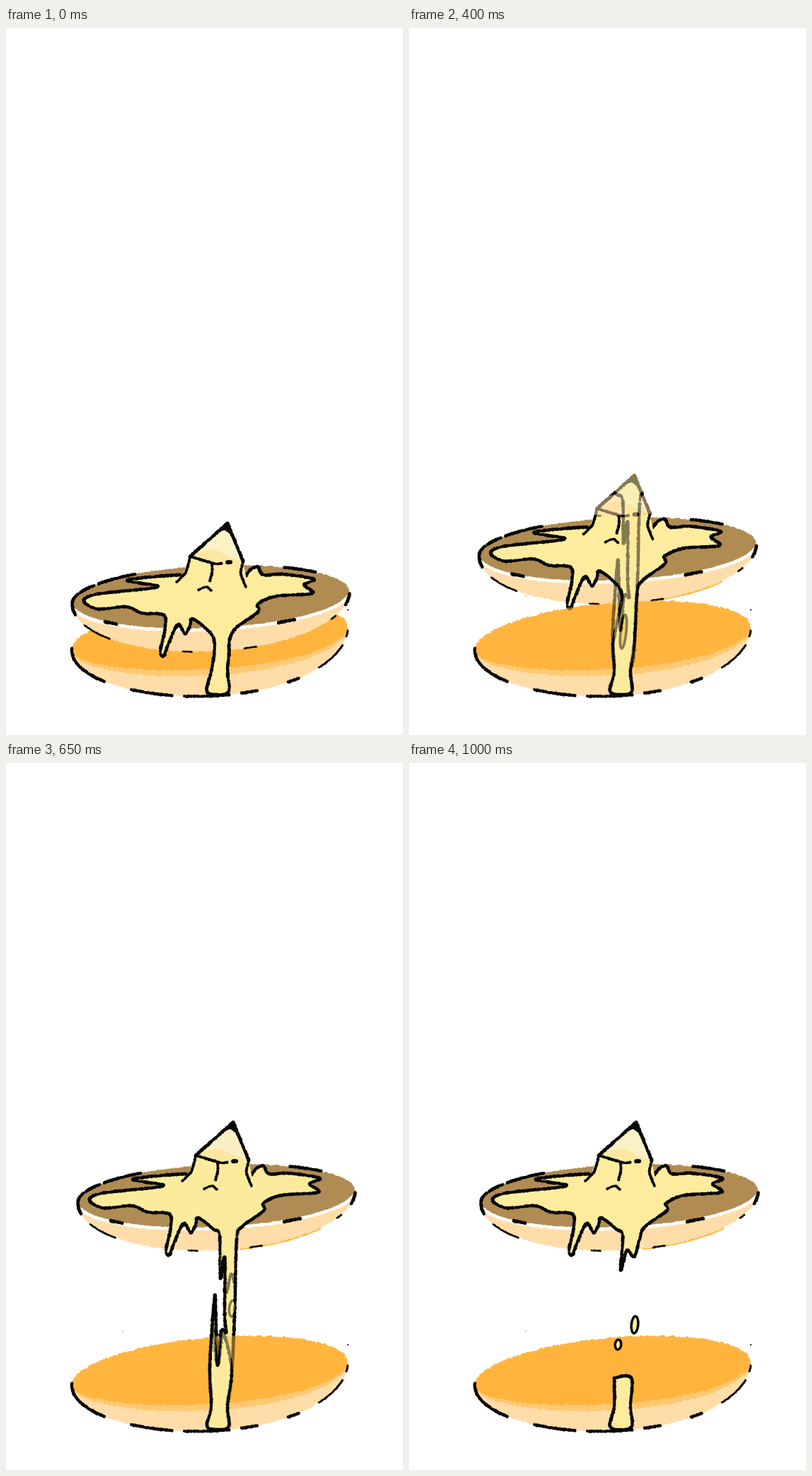
Recreate the animation shown at these times as an HTML page with a canvas. Size 561 by 998 pixels, loop 1.15 s.

```html
<!DOCTYPE html>
<html lang="en">
<head>
<meta charset="utf-8">
<title>Pancakes</title>
<style>
  html, body { margin: 0; width: 100%; height: 100%; overflow: hidden; background: #fff; }
  canvas { display: block; width: 561px; height: 998px; }
</style>
</head>
<body>
<canvas id="stage" width="561" height="998"></canvas>
<script>
const W = 561, H = 998, LOOP = 1150, STEP = 250, HOLD = 150;
const INK = '#080705', BROWN = '#b08c53', RIM = '#ffdda9', ORANGE = '#ffb53d',
      AMBER = '#ffc974', SYRUP = '#fdec9d', CREAM = '#fce7a2', PALE = '#faf2c6';

let ctx;

// Repeatable noise in -1..1
const noise = n => {
  const s = Math.sin(n * 127.1 + 11.7) * 43758.5453;
  return (s - Math.floor(s)) * 2 - 1;
};

const pairs = list => list.flatMap((v, i) => i % 2 ? [] : [[v, list[i + 1]]]);

// Catmull-Rom samples, about two pixels apart, through flat x,y key points
function curve(...list) {
  const p = pairs(list), out = [];
  for (let i = 0; i < p.length - 1; i++) {
    const a = p[Math.max(i - 1, 0)], b = p[i], c = p[i + 1], d = p[Math.min(i + 2, p.length - 1)];
    const n = Math.ceil(Math.hypot(c[0] - b[0], c[1] - b[1]) / 2);
    for (let k = 0; k < n; k++) {
      const t = k / n;
      out.push([0, 1].map(j => b[j] + 0.5 * t * (c[j] - a[j] +
        t * (2 * a[j] - 5 * b[j] + 4 * c[j] - d[j] +
        t * (3 * (b[j] - c[j]) + d[j] - a[j])))));
    }
  }
  return [...out, p[p.length - 1]];
}

// Tilted oval between two angles in degrees; the lower half has its own height
function oval(disc, from = 0, to = 360, low = disc.low) {
  const out = [];
  for (let deg = from; deg <= to; deg += 0.6) {
    const a = deg * Math.PI / 180, c = Math.cos(a), s = Math.sin(a);
    const ry = s < 0 ? disc.high : low * (1 + disc.lean * c);
    out.push([disc.x + disc.rx * c, disc.y + ry * s + disc.tilt * disc.rx * c]);
  }
  return out;
}

function fill(points, color, rough = 0.3) {
  ctx.beginPath();
  points.forEach(([x, y], i) =>
    ctx.lineTo(x + noise(i) * rough, y + noise(i + 500) * rough));
  ctx.fillStyle = color;
  ctx.fill();
}

// Crayon line: overlapping dots of uneven size
function ink(points, width = 4.7, color = INK) {
  ctx.fillStyle = color;
  ctx.beginPath();
  points.forEach(([x, y], i) => {
    const r = width / 2 * (1 + noise(i) * 0.16);
    ctx.moveTo(x + r, y);
    ctx.arc(x + noise(i + 90) * 0.3, y + noise(i + 180) * 0.3, r, 0, 7);
  });
  ctx.fill();
}

function drop(x, y, rx, ry, color = SYRUP) {
  ctx.beginPath();
  ctx.ellipse(x, y, rx, ry, 0.1, 0, 7);
  ctx.fillStyle = color;
  ctx.fill();
  ctx.strokeStyle = INK;
  ctx.lineWidth = 3.5;
  ctx.stroke();
}

const LOWER = { x: 288, y: 862, rx: 195, high: 51, low: 81, tilt: -0.082, lean: 0.1 };
const UPPER = { x: 297.5, y: 612, rx: 196, high: 45, low: 76, tilt: -0.043, lean: 0 };

const dashes = (disc, width, ...ends) =>
  pairs(ends).forEach(([a, b]) => ink(oval(disc, a, b), width));

function lowerPancake() {
  fill(oval(LOWER), RIM, 1);
  fill(oval(LOWER, 0, 360, 52), AMBER, 1.5);
  fill(oval(LOWER, 0, 360, 43), ORANGE, 1.5);
  dashes(LOWER, 4.4, 140, 183, 106, 125, 82, 101, 70, 77, 50, 56);
  dashes(LOWER, 3, 16, 38, 3, 8);
  ink([[483, 821]], 2);
  ink([[165, 802]], 2, ORANGE);
}

function upperPancake() {
  ink(oval(UPPER, 42, 80), 4, ORANGE);
  fill(oval(UPPER), RIM, 1);
  fill(oval(UPPER, 0, 360, 43), BROWN, 1);
  ctx.globalCompositeOperation = 'destination-out';
  ink(oval(UPPER, 9, 168, 45), 4.4);
  ctx.globalCompositeOperation = 'source-over';
  dashes(UPPER, 4.4, 168, 197, 200, 213, 216, 237, 302, 319, 2, 14);
  dashes(UPPER, 2.8, 137, 156, 71, 76, 98, 102, 26, 30);
  ink(oval(UPPER, 133, 140, 43));
  ink(oval(UPPER, 53, 61, 45));
}

function cone() {
  const tip = [321, 507], left = [268, 554], right = [343, 561], mid = [308, 564];
  fill([tip, left, [255, 586], [280, 604], [335, 604], [348, 586], right], SYRUP);
  fill([tip, left, mid, right], PALE);
  fill([left, [288, 545], [306, 545], [320, 553], right, mid], CREAM);
  fill([tip, [307, 520], [317, 517], [328, 525]], INK);
  ink(curve(...left, ...tip));
  ink(curve(...tip, ...right));
  ink(curve(...left, 285, 559, 303, 564, 312, 564), 4);
  ink(curve(321, 562, 325, 562), 5.6);
  ink(curve(...left, 262, 576, 249, 590), 4);
  ink(curve(...right, 340, 578, 347, 597), 4);
  ink(curve(299, 565, 299, 578, 296, 588), 4);
  ink(curve(280, 601, 291, 597, 298, 602), 3.6);
}

// Key points of the spill on either side of the strand
const LEFT = [
  254,580, 223,582, 179,588, 222,597, 138,607, 118,617, 138,628, 178,625, 200,634, 231,637,
  232,660, 226,688, 231,694, 238,676, 251,650, 261,663, 268,652, 272,642, 293,658];
const RIGHT = [
  333,655, 364,632, 364,621, 390,610, 441,606, 429,594, 443,586, 400,579, 372,580, 364,569,
  354,572, 347,581];
const FOOT = [290,908, 284,936, 300,941, 315,936, 313,908];

function outlined(points) {
  fill(points, SYRUP);
  ink(points);
}

// Each pose: lift of the upper pancake, strand in stage coordinates, loose parts
const poses = [
  { lift: [-8, 192], strand: [294,864, 294,885, ...FOOT, 315,885, 316,864] },
  { lift: [-2.5, 124.5], strand: [301,800, 297,825, 288,872, ...FOOT, 318,880, 322,800],
    loose() { drop(303, 852, 4, 24, ORANGE); } },
  { lift: [0, 0], strand: [302,668, 303,727, 309,698, 309,780, 311,804, 304,802, 299,850, 297,800,
                           295,752, 288,850, ...FOOT, 319,860, 323,780, 326,672] },
  { lift: [0, 0], strand: [302,668, 300,727, 309,698, 311,747, 318,722, 324,731, 326,672],
    loose() {
      outlined(curve(292,785, 288,855, ...FOOT, 319,858, 307,806, 299,850, 292,785));
      drop(320, 770, 4.6, 11.5);
    } },
  { lift: [0, 0], strand: [302,668, 299,716, 308,688, 318,697, 326,672],
    loose() {
      outlined(curve(290,868, ...FOOT, 314,868, 290,868));
      drop(319, 793, 4.8, 12);
      drop(295.5, 821, 4.3, 7);
    } }
];

function render({ lift, strand, loose }) {
  const layer = document.createElement('canvas');
  layer.width = W;
  layer.height = H;
  ctx = layer.getContext('2d');
  lowerPancake();
  ctx.save();
  ctx.translate(...lift);
  upperPancake();
  outlined(curve(...LEFT, ...strand.map((v, i) => v - lift[i % 2]), ...RIGHT));
  cone();
  ctx.restore();
  if (loose) loose();
  return layer;
}

const layers = poses.map(render);
const view = document.getElementById('stage').getContext('2d');

function draw(ms) {
  const t = ms % LOOP, i = Math.floor(t / STEP);
  view.clearRect(0, 0, W, H);
  view.drawImage(layers[i], 0, 0);
  // The next pose shows through only inside the current silhouette
  if (t % STEP >= HOLD && i < layers.length - 1) {
    view.save();
    view.globalCompositeOperation = 'source-atop';
    view.globalAlpha = 0.5;
    view.drawImage(layers[i + 1], 0, 0);
    view.restore();
  }
}

const start = performance.now();
function tick() {
  draw(performance.now() - start);
  requestAnimationFrame(tick);
}
tick();
</script>
</body>
</html>
```
